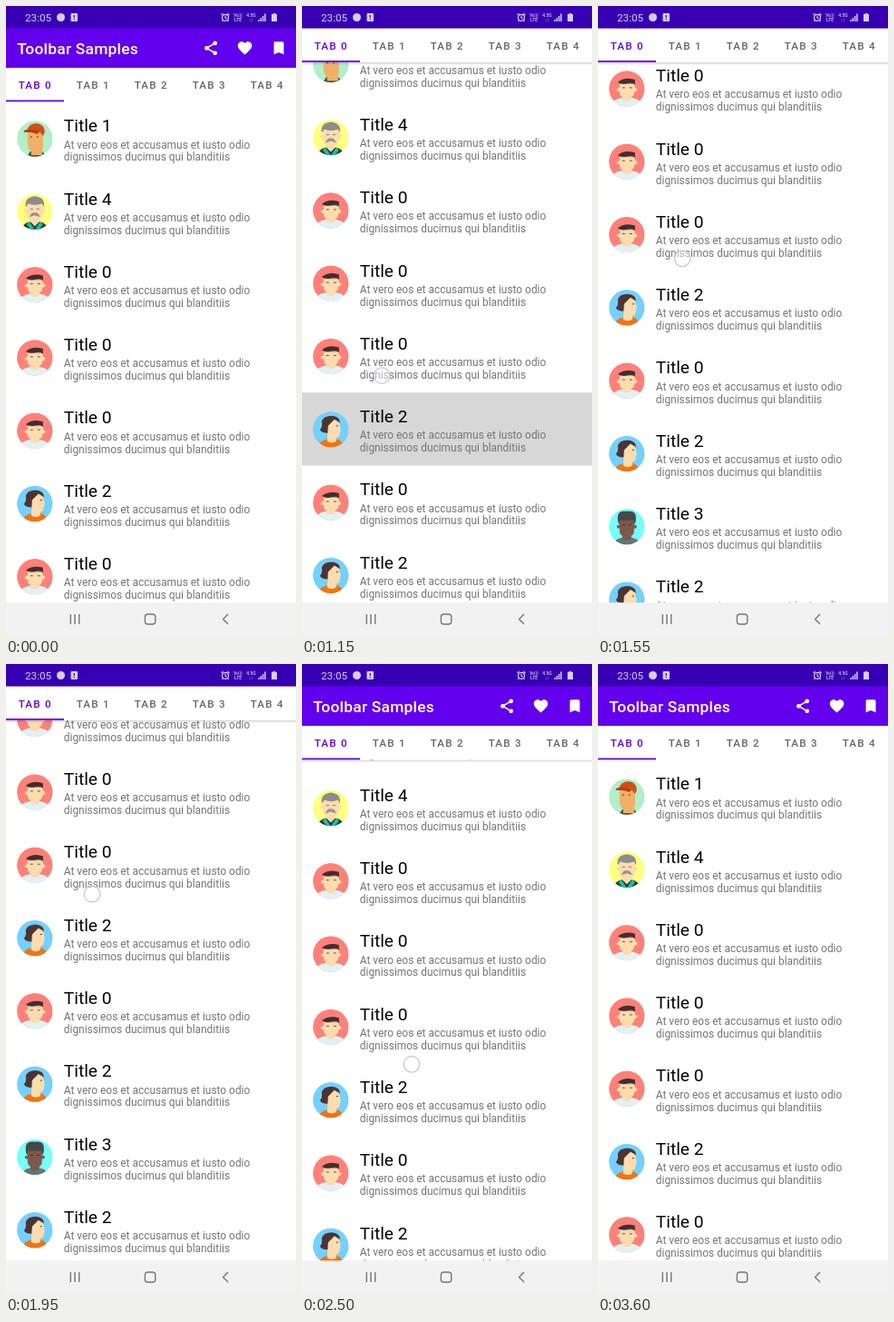
Recreate the animation shown at these times as an HTML page. Size 320x693 px, loop 3650 ms.

```html
<!DOCTYPE html>
<html lang="en">
<head>
<meta charset="utf-8">
<title>Toolbar Samples</title>
<style>
  html, body { margin: 0; height: 100%; overflow: hidden; background: #fff; }
  svg { display: block; width: 100%; height: 100%; font-family: Roboto, sans-serif; }
  .title { font-size: 19.2px; }
  .body { font-size: 11.93px; fill: #757575; }
  .tab { font-size: 11.6px; font-weight: 500; letter-spacing: 1.25px; fill: #666; }
  .tab.on { fill: #6200ee; }
  .bar { font-size: 17.4px; font-weight: 500; letter-spacing: .23px; fill: #fff; }
  .tiny { font-size: 5px; font-weight: 500; }
</style>
</head>
<body>
<svg viewBox="0 0 320 693">
  <defs>
    <clipPath id="round"><circle r="19.7"/></clipPath>
    <clipPath id="rowClip"><rect width="320" height="80.3"/></clipPath>
    <linearGradient id="shade" x2="0" y2="1">
      <stop stop-opacity=".18"/><stop offset="1" stop-opacity="0"/>
    </linearGradient>
    <g id="face0">
      <circle r="20" fill="#ff8078"/>
      <path d="M-18 20Q-17 12 -6 10H6Q17 12 18 20Z" fill="#e0f2f7"/>
      <path d="M-8 -5H9V2Q8 8 5 9V12Q0 15 -5 12V9Q-8 8 -8 2Z" fill="#fbdcae"/>
      <circle cx="-9" cy="1" r="2" fill="#fbdcae"/><circle cx="9.5" cy="1" r="2" fill="#fbdcae"/>
      <path d="M-10 -7Q-4 -12 4 -11L9 -10V-4Q7 -7 2 -6Q-5 -4 -10 -7Z" fill="#3c3032"/>
      <path d="M-5 -1H-2M3 -1H6" stroke="#3c3032" stroke-width=".8"/>
    </g>
    <g id="face1">
      <circle r="20" fill="#b0efc8"/>
      <path d="M-9 20L-5 14H8L14 20Z" fill="#405a38"/>
      <path d="M-8 -7H9V6Q9 11 8 13V18H-4V14Q-8 11 -8 4Z" fill="#f0b068"/>
      <path d="M-9 -7Q-8 -17 2 -17Q11 -16 11 -7L9 -3L6 -7Z" fill="#cf5018"/>
      <path d="M-12 -9Q-5 -12 5 -8L3 -5Q-5 -8 -12 -7Z" fill="#b84010"/>
      <path d="M-5 -2H-3M2 -2H4" stroke="#503018"/>
    </g>
    <g id="face2">
      <circle r="20" fill="#74d0ff"/>
      <path d="M-10 -9Q-8 -15 1 -15Q10 -14 10 -8L6 -2L-3 4Q-11 4 -12 0Q-9 -2 -10 -9Z" fill="#4b3434"/>
      <path d="M-14 20Q-12 12 -5 11H8Q13 13 14 20Z" fill="#ef7414"/>
      <path d="M-3 -4L4 -11L9 -8L11 0L9 8L6 9V13Q1 16 -4 13Z" fill="#fbdcae"/>
      <path d="M6 -4H8" stroke="#4b3434"/>
    </g>
    <g id="face3">
      <circle r="20" fill="#74fff8"/>
      <path d="M-16 20Q-13 13 -5 12H5Q13 13 16 20Z" fill="#667476"/>
      <rect x="-10" y="-17" width="20" height="16" rx="6" fill="#484646"/>
      <path d="M-8 -7H8V4Q8 9 5 10V13Q0 16 -5 13V10Q-8 9 -8 4Z" fill="#7c584d"/>
      <circle cx="-9" cy="0" r="2" fill="#7c584d"/><circle cx="9" cy="0" r="2" fill="#7c584d"/>
      <path d="M-5 -2H-2M2 -2H5" stroke="#3a2c2a"/>
    </g>
    <g id="face4">
      <circle r="20" fill="#ffff80"/>
      <path d="M-15 20Q-13 12 -5 11H5Q13 12 15 20Z" fill="#30383a"/>
      <path d="M-6 11L0 20L6 11L9 14L4 20H-4L-9 14Z" fill="#0cc8a4"/>
      <path d="M-9 -10H9V2Q8 8 5 9V11L0 16L-5 11V9Q-8 8 -9 2Z" fill="#fbdcae"/>
      <circle cx="-9.5" cy="-1" r="2" fill="#fbdcae"/><circle cx="9.5" cy="-1" r="2" fill="#fbdcae"/>
      <path d="M-10 -5Q-12 -16 0 -17Q12 -16 10 -5L8 -9Q0 -6 -7 -9Z" fill="#8c8c8c"/>
      <path d="M-6 6Q-4 0 0 1Q4 0 6 6Q3 5 0 4Q-3 5 -6 6Z" fill="#949494"/>
      <path d="M-5 -3H-2M2 -3H5" stroke="#777"/>
    </g>
  </defs>

  <rect width="320" height="693" fill="#fff"/>
  <g id="list"></g>

  <g id="header">
    <rect id="shadow" y="105.5" width="320" height="3" fill="url(#shade)"/>
    <rect y="24" width="320" height="44" fill="#6200ee"/>
    <text class="bar" x="12.3" y="53">Toolbar Samples</text>
    <g fill="#fff">
      <g transform="translate(216.7 37) scale(.778)">
        <path d="M18 5L6 12L18 19" fill="none" stroke="#fff" stroke-width="2"/>
        <circle cx="18" cy="5" r="3"/><circle cx="6" cy="12" r="3"/><circle cx="18" cy="19" r="3"/>
      </g>
      <path transform="translate(254.2 37) scale(.778)" d="M12 21.35l-1.45-1.32C5.4 15.36 2 12.28 2 8.5 2 5.42 4.42 3 7.5 3c1.74 0 3.41.81 4.5 2.09C13.09 3.81 14.76 3 16.5 3 19.58 3 22 5.42 22 8.5c0 3.78-3.4 6.86-8.55 11.54z"/>
      <path transform="translate(291.7 37) scale(.778)" d="M17 3H7c-1.1 0-2 .9-2 2v16l7-3 7 3V5c0-1.1-.9-2-2-2z"/>
    </g>
    <rect y="68" width="320" height="37.5" fill="#fff"/>
    <g id="tabs"></g>
    <rect y="103.5" width="64" height="1.8" fill="#6200ee"/>
  </g>

  <rect width="320" height="24.5" fill="#3700b3"/>
  <g fill="#d8ccf2">
    <text x="21" y="16.8" font-size="11.7">23:05</text>
    <circle cx="60.5" cy="12.5" r="4.5"/>
    <rect x="71.5" y="8" width="7.5" height="9" rx="1"/>
    <path d="M75.2 10V13M75.2 14V15.2" stroke="#3700b3" stroke-width="1.2"/>
    <g fill="none" stroke="#d8ccf2" stroke-width="1.2">
      <circle cx="242" cy="12.8" r="3.5"/>
      <path d="M242 10.8V13L243.6 14M237.6 10L239.6 8.2M246.4 10L244.4 8.2M239.5 15.6L238.4 17M244.5 15.6L245.6 17"/>
      <path d="M279 17V15M281.3 17V13M283.6 17V11M285.9 17V8.5" stroke-width="1.5"/>
    </g>
    <g class="tiny" text-anchor="middle">
      <text x="256" y="11.8">Vo))</text><text x="256" y="17">LTE</text>
      <text x="270.5" y="11.8">4.5G</text><text x="270.5" y="17">↓↑</text>
    </g>
    <path d="M293 9H294.6V8H297.4V9H299V17H293Z"/>
  </g>

  <rect y="656.3" width="320" height="37" fill="#f2f2f2"/>
  <g fill="none" stroke="#777" stroke-width="1.4">
    <path d="M71.3 669V680M76 669V680M80.7 669V680"/>
    <rect x="153.4" y="669" width="11.4" height="11" rx="3"/>
    <path d="M245 669L239.6 674.5L245 680"/>
  </g>
  <circle id="finger" r="8.8" fill="#fff" fill-opacity=".45" stroke="#cbc6dd" stroke-width="1.3"/>
</svg>
<script>
  const $ = id => document.getElementById(id);
  const clamp = (v, lo, hi) => Math.min(hi, Math.max(lo, v));

  const LOOP = 3650, ROW = 80.3, TOP = 105.5, BAR = 43.5, SLOP = 8, LAG = 28;
  const PRESS = 850, TURN = 1950, RELEASE = 2800, PRESSED_ROW = 5;
  const START_Y = 507;

  // time, x, y of the dragging finger
  const drag = [
    [850, 91, 507], [900, 91, 503], [1150, 88, 407], [1550, 93, 278],
    [1750, 95, 253], [1950, 95, 253], [2500, 121, 440], [2800, 130, 525]
  ];

  // Monotone cubic through the drag points
  function track(t, k) {
    const p = drag, last = p.length - 1;
    t = clamp(t, p[0][0], p[last][0]);
    let i = 0;
    while (i < last - 1 && t > p[i + 1][0]) i++;
    const slope = j => (p[j + 1][k] - p[j][k]) / (p[j + 1][0] - p[j][0]);
    const tangent = j => {
      if (j === 0) return 0;
      if (j === last) return slope(j - 1);
      const a = slope(j - 1), b = slope(j);
      return a * b > 0 ? 2 * a * b / (a + b) : 0;
    };
    const d = p[i + 1][0] - p[i][0], u = (t - p[i][0]) / d, v = 1 - u;
    return v * v * (1 + 2 * u) * p[i][k] + u * u * (3 - 2 * u) * p[i + 1][k]
      + d * u * v * (v * tangent(i) - u * tangent(i + 1));
  }

  const scrollAt = t => Math.max(0, START_Y - SLOP - track(t - LAG, 2));
  const peak = scrollAt(TURN);

  $('list').innerHTML = [1, 4, 0, 0, 0, 2, 0, 2, 3, 2].map((n, i) => `
    <g transform="translate(0 ${TOP + i * ROW})">
      ${i === PRESSED_ROW ? '<g clip-path="url(#rowClip)"><circle id="ripple" cx="91" cy="1"/></g>' : ''}
      <g transform="translate(31.8 40.5)"><use href="#face${n}" clip-path="url(#round)"/></g>
      <text class="title" x="63.8" y="32.8">Title ${n}</text>
      <text class="body" x="63.8" y="51">At vero eos et accusamus et iusto odio</text>
      <text class="body" x="63.8" y="64.9">dignissimos ducimus qui blanditiis</text>
    </g>`).join('');

  $('tabs').innerHTML = [0, 1, 2, 3, 4].map(n =>
    `<text class="tab${n ? '' : ' on'}" x="${13.7 + n * 64}" y="91.3">TAB ${n}</text>`).join('');

  function draw(t) {
    const s = scrollAt(t);
    const hidden = clamp(t < TURN ? s : BAR - (peak - s), 0, BAR);
    $('list').setAttribute('transform', `translate(0 ${-s})`);
    $('header').setAttribute('transform', `translate(0 ${-hidden})`);
    $('shadow').setAttribute('opacity', clamp((s - hidden) / 8, 0, 1));

    const ripple = $('ripple');
    ripple.setAttribute('r', 250 * clamp((t - 950) / 170, 0, 1));
    ripple.setAttribute('opacity', .155 * clamp((1360 - t) / 200, 0, 1));

    const finger = $('finger');
    finger.setAttribute('visibility', t >= PRESS && t < RELEASE ? 'visible' : 'hidden');
    finger.setAttribute('cx', track(t, 1));
    finger.setAttribute('cy', track(t, 2));
  }

  const begin = performance.now();
  function tick() {
    draw((performance.now() - begin) % LOOP);
    requestAnimationFrame(tick);
  }
  tick();
</script>
</body>
</html>
```
